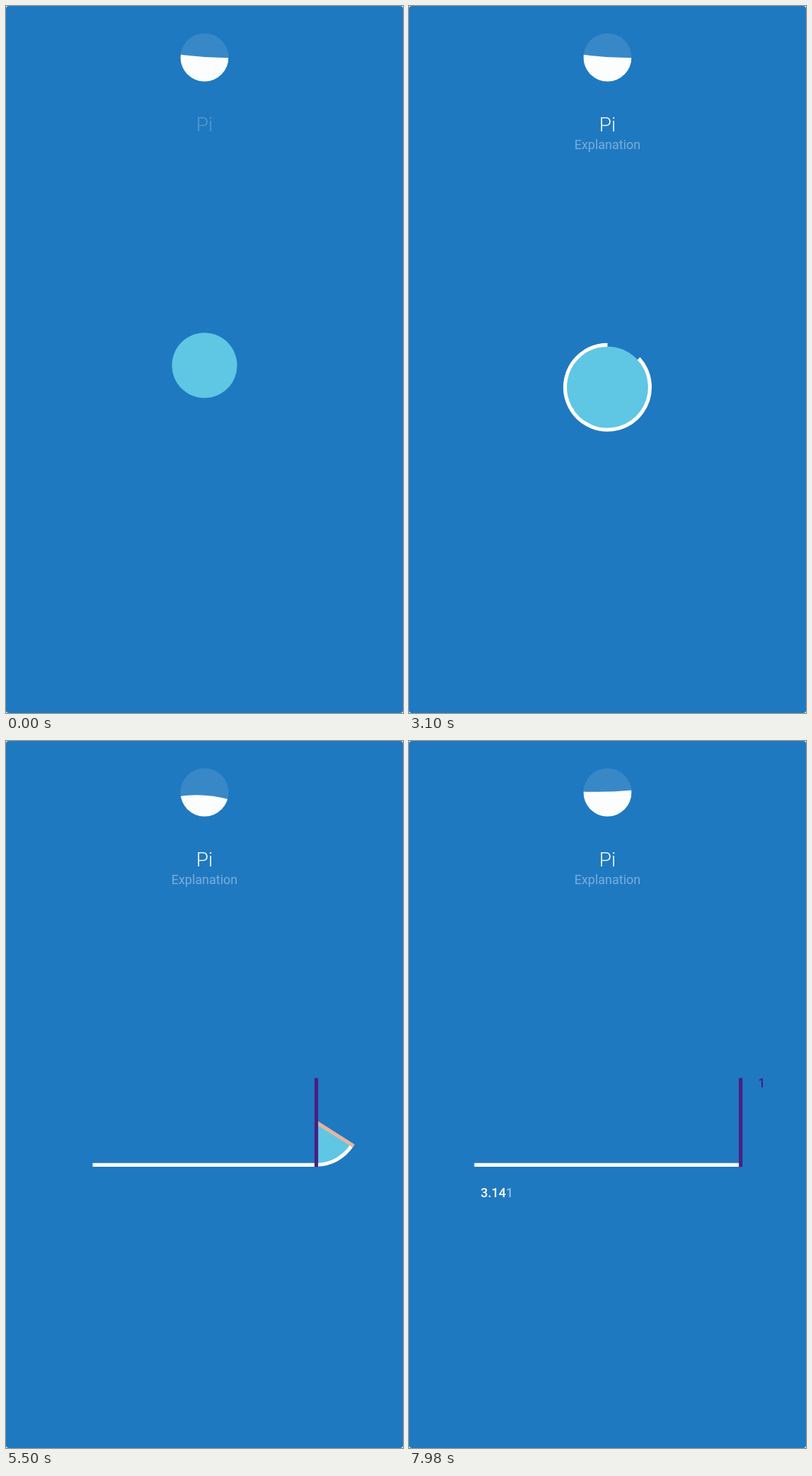
Recreate the animation shown at these times as an HTML page. Size 561 by 998 pixels, loop 8 s.

```html
<!DOCTYPE html>
<html lang="en">
<head>
<meta charset="utf-8">
<title>Pi</title>
<style>
  html, body { margin: 0; width: 100%; height: 100%; overflow: hidden; background: #fff; }
  svg { display: block; width: 561px; height: 998px; }
  text { font-family: Roboto, "Open Sans", sans-serif; font-size: 18px; fill: #fff; }
  .mid { text-anchor: middle; }
  .light { font-weight: 300; }
  .bold { font-weight: 500; }
  .stroke { fill: none; stroke: #fff; stroke-width: 5.2; }
</style>
</head>
<body>
<svg viewBox="0 0 561 998">
  <defs><clipPath id="bowl"><circle cx="280.5" cy="72.5" r="34"/></clipPath></defs>
  <rect width="561" height="998" rx="4" fill="#1f79c0"/>

  <circle cx="280.5" cy="72.5" r="34" fill="#fff" fill-opacity=".11"/>
  <path id="wave" fill="#fff" fill-opacity=".98" clip-path="url(#bowl)"/>

  <text id="title" class="mid light" x="280.5" y="177" style="font-size:28px">Pi</text>
  <text id="subtitle" class="mid" x="280.5" y="202">Explanation</text>

  <path id="disc" fill="#5fc6e4"/>
  <path id="ring" class="stroke"/>
  <path id="ground" class="stroke"/>
  <path id="radius" class="stroke" style="stroke:#e3b69f"/>
  <path id="diameter" class="stroke" style="stroke:#4a1f83"/>

  <text id="one" class="bold" x="493.2" y="489" style="fill:#4a1f83">1</text>
  <text id="digits" class="bold" x="101.2" y="644"></text>
</svg>
<script>
const LOOP = 8000, CX = 280.5, CY = 538.2, R = 59.9, HALF = 2.6, TAU = Math.PI * 2;
const $ = id => document.getElementById(id);
const clamp = v => Math.max(0, Math.min(1, v));
const ramp = (t, start, length) => clamp((t - start) / length);
const swing = (t, peak, period) => Math.cos(TAU * (t - peak) / period);
const draw = (id, d) => $(id).setAttribute('d', d);

// cubic-bezier(.33, 0, .137, 1): quick start, long tail
function ease(x) {
  if (x <= 0 || x >= 1) return clamp(x);
  let lo = 0, hi = 1, s;
  for (let i = 0; i < 24; i++) {
    s = (lo + hi) / 2;
    const q = 1 - s;
    if (3 * .33 * s * q * q + 3 * .137 * s * s * q + s ** 3 < x) lo = s; else hi = s;
  }
  return s * s * (3 - 2 * s);
}

// Angles run clockwise from the bottom of the wheel.
function point(x, y, r, a) {
  return `${x - r * Math.sin(a)} ${y + r * Math.cos(a)}`;
}
function arc(x, y, r, from, to) {
  const sweep = to > from ? 1 : 0;
  const reach = a => `A${r} ${r} 0 0 ${sweep} ${point(x, y, r, a)}`;
  return point(x, y, r, from) + reach((from + to) / 2) + reach(to);
}

// The water surface is a parabola whose level, tilt and sag swing independently.
function drawWave(t) {
  const pulse = ((1 + swing(t, 1540, 1980)) / 2) ** 4;
  const level = 70.8 + 7 * pulse;
  const tilt = 2.9 * swing(t, 5850, 3080);
  const sag = 3.5 * swing(t, 1540, LOOP);
  const edge = level - sag * 2 / 3, middle = level + sag * 4 / 3;
  draw('wave', `M${CX - 34} ${edge - tilt}Q${CX} ${middle} ${CX + 34} ${edge + tilt}V110H${CX - 34}Z`);
}

function drawWheel(t) {
  const grow = ease(ramp(t, -1044, 2172));
  const trace = ease(ramp(t, 2304, 1432));
  const drop = ease(ramp(t, 3500, 1183));
  const roll = ease(ramp(t, 4702, 1532));

  const shift = Math.PI * R * roll, x = CX + shift, cut = TAU * roll;
  const y = CY - 155 * (1 - grow), r = 57.5 * grow;
  const whole = roll === 0, gone = roll > .9995;

  draw('disc', gone ? '' : whole ? `M${arc(x, y, r, 0, TAU)}Z`
    : `M${x} ${y}L${arc(x, y, r, cut, TAU)}Z`);
  draw('ring', gone || !trace ? '' : whole
    ? `M${arc(x, CY, R, Math.PI, Math.PI - TAU * trace)}`
    : `M${arc(x, CY, R, cut, TAU)}`);
  draw('ground', whole ? '' : `M${CX - shift} ${CY + R + .3}H${x}`);
  draw('radius', whole || gone ? '' : `M${x} ${CY}L${point(x, CY, R + HALF, cut)}`);
  draw('diameter', drop ? `M${x} ${CY - R - HALF}v${2 * (R + HALF) * drop + .5}` : '');
}

const digits = [...'3.141'].map(c => {
  const span = document.createElementNS('http://www.w3.org/2000/svg', 'tspan');
  span.textContent = c;
  $('digits').append(span);
  return span;
});

function render(t) {
  drawWave(t);
  drawWheel(t);
  $('title').style.fillOpacity = .97 * ramp(t, -200, 800);
  $('subtitle').style.fillOpacity = .4 * ramp(t, 300, 700);
  $('one').style.fillOpacity = ramp(t, 5900, 300);
  digits.forEach((span, i) => span.style.fillOpacity = ramp(t, 6560 + 330 * i, 200));
}

const start = performance.now();
function tick() {
  render((performance.now() - start) % LOOP);
  requestAnimationFrame(tick);
}
tick();
</script>
</body>
</html>
```
